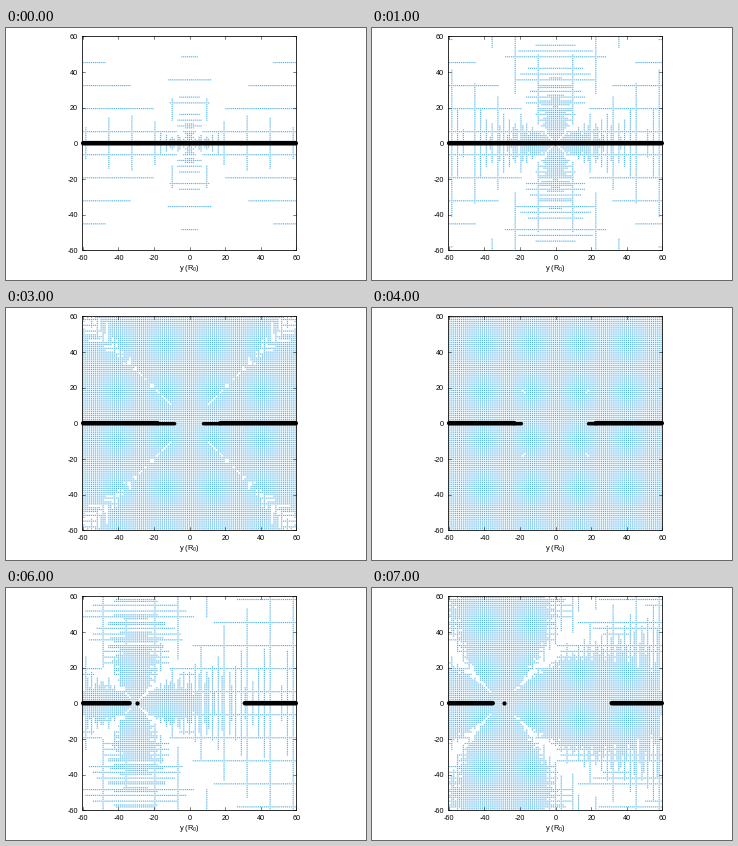
Write a matplotlib script that moves like this. It is 360 by 252 pixels and loops after 8 s.

```python
import numpy as np
import matplotlib.pyplot as plt
from matplotlib.animation import FuncAnimation
from matplotlib.collections import LineCollection

W, H = 360, 252
CX, CY, SCALE = 183.5, 115.2, 1.783
LEFT, RIGHT, TOP, BOTTOM = 76.2, 290.4, 8.2, 222.3
BLUE = "#56b4e9"
PITCH = 14 / 13
UNIT = 0.016
DOT = 1.15

# flow centre, strength, vortex radius, decay, column threshold,
# left tip, right tip, length of thinned rim, droplet position
STEPS = [
    (0, 1.0, 1, 0.0, 1.0, 0, 0, 0, None),
    (0, 2.8, 8, 0.15, 0.6, 0, 0, 0, None),
    (0, 7.5, 14, 0.35, 0.3, -1.3, 1.3, 10, None),
    (0, 50, 18, 0.5, 0.3, -7.5, 7.0, 9.5, None),
    (0, 150, 26, 0.8, 0.3, -18.3, 17.7, 4, None),
    (-30, 1.15, 1, 0.0, 0.3, -30.0, 29.4, 0, None),
    (-30, 4.5, 10, 0.2, 0.3, -32.8, 30.2, 0, -29.5),
    (-30, 14, 18, 0.35, 0.3, -34.4, 30.7, 0, -28.9),
]

plt.rcParams["font.family"] = "Liberation Sans"
plt.rcParams["mathtext.default"] = "regular"
fig = plt.figure(figsize=(W / 72, H / 72), dpi=72, facecolor="white")
ax = fig.add_axes([0, 0, 1, 1])
ax.set_xlim(0, W)
ax.set_ylim(H, 0)
ax.axis("off")


def px(x):
    return CX + SCALE * np.asarray(x)


def py(y):
    return CY - SCALE * np.asarray(y)


def line(xs, ys, width=0.8, z=4, **kw):
    return ax.plot(xs, ys, color="black", lw=width, zorder=z, **kw)[0]


def draw_frame():
    line([LEFT, RIGHT, RIGHT, LEFT, LEFT], [TOP, TOP, BOTTOM, BOTTOM, TOP])
    for v in range(-60, 61, 20):
        x, y = px(v), py(v)
        for edge, d in ((TOP, 3), (BOTTOM, -3)):
            line([x, x], [edge, edge + d], 0.5)
        for edge, d in ((LEFT, 3), (RIGHT, -3)):
            line([edge, edge + d], [y, y], 0.5)
        ax.text(x + 0.3, 230, str(v), size=7.2, ha="center", va="center_baseline")
        ax.text(72, y + 0.3, str(v), size=7.2, ha="right", va="center_baseline")
    ax.text(183.5, 242.3, "y (R$_{0}$)", size=7.5, ha="center", va="baseline")


def thresholds(n):
    """Displacement needed to show a row, moving outward and inward."""
    m = np.abs(n) % 12
    rest = 3.6 + (5 * m % 12) * 0.42
    out = np.select([m == 6, m == 3, m == 0, m == 9], [0.02, 2.1, 3, 3.6], rest)
    inn = np.select([m == 9, m == 0, m == 3, m == 6], [1.25, 2, 2.7, 4], rest)
    return out * UNIT, inn * UNIT


def shown(u, pos, out, inn):
    outward = u * np.where(pos < 0, -1, 1)
    return (outward > out) | (-outward > inn)


idx = np.arange(-55, 56)
NX, NY = np.meshgrid(idx, idx)
GX, GY = NX * PITCH, NY * PITCH


def flow(centre, q, radius, k):
    """Four-cell flow around the opening hole."""
    x = GX - centre
    r = np.hypot(x, GY) + 0.3
    t = np.arctan2(GY, x)
    s = (r / radius) ** k
    g = 2 / (s + 1 / s)
    ur = q * g / r * np.cos(2 * t)
    ut = q * k * g / (2 * r) * (s * s - 1) / (s * s + 1) * np.sin(2 * t)
    return ur * np.cos(t) - ut * np.sin(t), ur * np.sin(t) + ut * np.cos(t)


def dashes(centre, q, radius, k, col):
    u, v = flow(centre, q, radius, k)
    out_x, in_x = thresholds(NX)
    m = np.abs(NX) % 12
    out_x = np.where(m == 6, col * UNIT, out_x)
    in_x = np.where(m == 9, 0.6 * UNIT, in_x)
    mask = shown(u, GX, out_x, in_x) | shown(v, GY, *thresholds(NY))
    x, y = px(GX[mask]), py(GY[mask])
    ends = [np.column_stack([x + d, y]) for d in (-DOT / 2, DOT / 2)]
    return np.stack(ends, axis=1)


draw_frame()
field = LineCollection([], colors=BLUE, linewidths=DOT, capstyle="butt",
                       zorder=2, snap=False)
ax.add_collection(field, autolim=False)
sheet = dict(z=6, solid_capstyle="round", snap=False)
thick = [line([], [], 4.6, **sheet) for _ in range(2)]
thin = [line([], [], 3.5, **sheet) for _ in range(2)]
drop = line([], [], 0, z=6, marker="o", ms=4.2, mew=0)


def update(i):
    centre, q, radius, k, col, tip_l, tip_r, rim, blob = STEPS[i]
    field.set_segments(dashes(centre, q, radius, k, col))
    for j, (tip, side) in enumerate(((tip_l, -1), (tip_r, 1))):
        end = px(tip) + (side * 1.5 if tip else 0)
        start = end + side * rim * SCALE
        thick[j].set_data([CX + side * 106.3, start], [CY, CY])
        if rim:
            thin[j].set_data([start, end], [CY + 0.5, CY + 0.5])
        else:
            thin[j].set_data([], [])
    if blob is None:
        drop.set_data([], [])
    else:
        drop.set_data([px(blob)], [CY])
    return [field, *thick, *thin, drop]


anim = FuncAnimation(fig, update, frames=len(STEPS), interval=1000,
                     repeat=True, repeat_delay=0)
plt.show()
```
